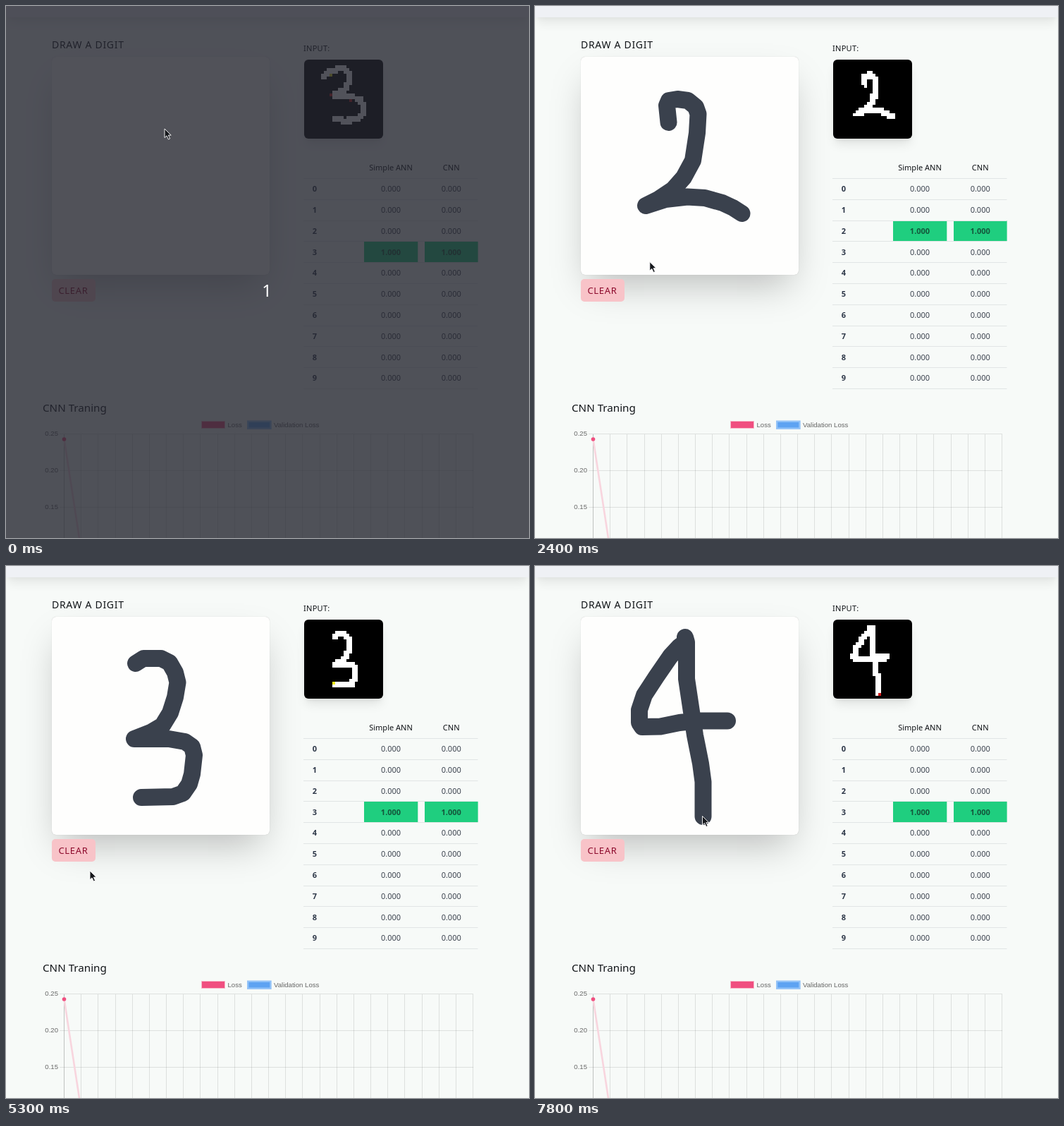
These frames come from a looping animation (742x754 px, 8 s). An HTML page:

```html
<!DOCTYPE html>
<html lang="en">
<head>
<meta charset="utf-8">
<style>
  html, body { margin: 0; width: 100%; height: 100%; overflow: hidden; background: #f7faf8; }
  div, svg { position: absolute; }
  svg { left: 0; top: 0; }
  .bar { left: 0; top: 0; width: 742px; height: 16px; background: #eff1f5;
    box-shadow: 0 10px 15px -3px rgba(0,0,0,.1), 0 4px 6px -2px rgba(0,0,0,.05); }
  .pad { left: 65px; top: 72px; width: 309px; height: 308.5px; border-radius: 6px; background: #fefefd;
    box-shadow: 0 25px 50px -12px rgba(0,0,0,.25), 0 0 1px rgba(0,0,0,.25); }
  .input { left: 422.5px; top: 76px; width: 112.5px; height: 112px; border-radius: 6px; background: #000;
    box-shadow: 0 10px 15px -3px rgba(0,0,0,.1), 0 4px 6px -2px rgba(0,0,0,.05); }
  .clear { left: 65px; top: 387px; width: 62px; height: 32px; border-radius: 5px; background: #f8c3c8; }
  text { font-family: "Noto Sans", "Open Sans", sans-serif; fill: #111418; }
  .chart text { font-family: "Liberation Sans", Arial, sans-serif; fill: #666; }
  .ink path { fill: none; stroke: #3a414d; stroke-width: 24; stroke-linecap: round; stroke-linejoin: round; }
</style>
</head>
<body>
<div class="bar"></div>
<div class="pad"></div>
<div class="input"></div>
<div class="clear"></div>
<svg id="stage" width="742" height="754" viewBox="0 0 742 754">
  <g id="labels"></g>
  <g id="marks"></g>
  <g id="table"></g>
  <g id="chart" class="chart"></g>
  <g id="ink" class="ink"></g>
  <g id="bitmaps"></g>
  <g id="countdown">
    <rect width="742" height="754" fill="#252630" fill-opacity=".795"/>
    <text x="370" y="412" font-size="24" text-anchor="middle" style="fill:#fff">1</text>
  </g>
  <path id="cursor" d="M0 0V12.6L3 9.9L5.4 15L7.6 14L5.3 9.1H9.2Z" fill="#16181c" stroke="#fff" stroke-width=".9"/>
</svg>
<script>
const $ = id => document.getElementById(id);
const LOOP = 8000, STEP = 100, ROW = 29.8;

function add(parent, tag, attrs, content = '') {
  const el = document.createElementNS('http://www.w3.org/2000/svg', tag);
  for (const name in attrs) el.setAttribute(name, attrs[name]);
  el.textContent = content;
  return parent.appendChild(el);
}
// Places text by the vertical centre of its capitals.
function label(parent, content, x, middle, size, attrs = {}) {
  return add(parent, 'text', { x, y: middle + size * .36, 'font-size': size, ...attrs }, content);
}
const line = (parent, x1, y1, x2, y2, stroke, width = 1) =>
  add(parent, 'line', { x1, y1, x2, y2, stroke, 'stroke-width': width });
const box = (parent, x, y, width, height, fill, attrs = {}) =>
  add(parent, 'rect', { x, y, width, height, fill, ...attrs });

// Headings
label($('labels'), 'DRAW A DIGIT', 65, 54.7, 14, { 'letter-spacing': '.05em' });
label($('labels'), 'INPUT:', 422, 60.5, 11, { 'letter-spacing': '.025em' });
label($('labels'), 'CLEAR', 74.5, 403.5, 13, { 'letter-spacing': '.05em', style: 'fill:#8d0a2c' });
label($('labels'), 'CNN Traning', 52, 569.7, 15.2);

// Prediction table
const COLUMNS = [546, 631.7];
const centred = { 'text-anchor': 'middle' };
['Simple ANN', 'CNN'].forEach((name, i) => label($('table'), name, COLUMNS[i], 229.5, 11, centred));
const cells = [];
for (let row = 0; row <= 10; row++) {
  const y = Math.round(244 + row * ROW) + .5;
  line($('table'), 422, y, 669.5, y, '#e1e5e5');
  if (row === 10) break;
  const middle = 259.3 + row * ROW;
  label($('table'), row, 438, middle, 11, { ...centred, 'font-weight': 700, style: 'fill:#2d3748' });
  cells.push(COLUMNS.map(x => label($('table'), '0.000', x, middle, 11, centred)));
}
const marks = [[508, 76.3], [594, 75.6]].map(([x, w]) => box($('marks'), x, 0, w, 29, '#1fce7f'));

function highlight(best) {
  marks.forEach(mark => mark.setAttribute('y', Math.round(244.4 + best * ROW)));
  cells.forEach((pair, row) => pair.forEach(cell => {
    const on = row === best;
    cell.textContent = on ? '1.000' : '0.000';
    cell.style.fill = on ? '#14573c' : '#3b424e';
    cell.style.fontWeight = on ? 700 : 400;
  }));
}

// Training chart
const chart = $('chart');
box(chart, 277.5, 588.5, 33, 10, '#f04f80', { stroke: '#f8b9c9' });
label(chart, 'Loss', 314.5, 593.3, 9.6);
box(chart, 343.2, 588.7, 32.3, 10, '#5ea3f2', { stroke: '#93c3f8', 'stroke-width': 2.4 });
label(chart, 'Validation Loss', 380, 593.3, 9.6);
['0.25', '0.20', '0.15'].forEach((tick, i) => {
  const y = 607 + i * 52;
  label(chart, tick, 74, y - 1, 9.6, { 'text-anchor': 'end' });
  line(chart, 76, y - .5, 663, y - .5, 'rgba(0,0,0,.1)');
});
for (let i = 0; i <= 24; i++) {
  const x = Math.round(82 + i * 24.17) + .5;
  line(chart, x, 607, x, 754, `rgba(0,0,0,${i ? .1 : .22})`);
}
line(chart, 82.5, 614, 106.6, 771, '#f8d5de', 2.6);
add(chart, 'circle', { cx: 82.5, cy: 614, r: 2.8, fill: '#f04f80' });

// Handwritten digits: pace lists [time, drawn share]; dots are tinted bitmap cells [column, row, colour].
const digits = [
  { d: 'M145 141L161 121L189 110L222 108L238 119L241 160L222 187L183 209L249 215L288 231L296 253L293 281L277 303L227 311L189 303',
    shown: 0, dots: [[9, 5, '#e8e020'], [9, 12, '#c01818'], [16, 14, '#c01818']] },
  { d: 'M189.5 165L187 141L190 134L202 132L217 134L228 143L231.5 153L230 180L224 219L211 243L196 260L175 274L157 283L185 274L216 270.5L241 272L266 279L281 286L293.5 294',
    pace: [[500, 0], [1250, 1]], clear: 2900, shown: 1500, dots: [] },
  { d: 'M184 138L195 131L220 131L232 137L240 151L243.5 165L240 186L233 208L222 226L205 236L182 245L231 245L254 249L264 256L267 268L264 295L260 309L251 322L237 327L192 328',
    pace: [[3400, 0], [3600, .195], [4450, 1]], clear: 5600, shown: 4600, dots: [[10, 22, '#f4ee20']] },
  { d: 'M273 219.5L228 219.5L205 222L178 227.5L152 228L148 222L148 204L155 183L172 157L192 128L205 114L213 108L213 101L215 108L215 160L221 200L227 240L235 280L238.5 306L238.5 355',
    pace: [[6500, 0], [6600, .083], [7400, .907], [7560, 1]], clear: LOOP, shown: 7800, dots: [[16, 26, '#d01818']] }
];

// Samples the stroke on a 28 x 28 grid, 11 px per cell, and shows it at 4 px per cell.
function makeBitmap({ path, dots }) {
  const group = add($('bitmaps'), 'g', { 'shape-rendering': 'crispEdges' });
  const at = (col, row) => [423 + col * 4, 76 + row * 4];
  const point = $('stage').createSVGPoint();
  let d = '';
  for (let row = 0; row < 28; row++)
    for (let col = 0; col < 28; col++) {
      point.x = 65 + (col + .5) * 11;
      point.y = 72 + (row + .5) * 11;
      if (path.isPointInStroke(point)) d += `M${at(col, row)}h4v4h-4z`;
    }
  add(group, 'path', { d, fill: '#fff' });
  dots.forEach(([col, row, fill]) => box(group, ...at(col, row), 4, 4, fill));
  return group;
}
for (const digit of digits) {
  digit.path = add($('ink'), 'path', { d: digit.d });
  digit.length = digit.path.getTotalLength();
  digit.bitmap = makeBitmap(digit);
}

// Pointer positions between strokes: [time, x, y]
const pointer = [
  [0, 225, 174], [100, 220, 174], [200, 212, 172], [400, 189.5, 165], [1300, 292.5, 292],
  [1500, 281, 295], [1600, 281, 295], [2500, 148, 371], [2700, 104, 391], [2800, 104, 391],
  [3300, 184, 138], [4500, 191, 328], [4700, 186, 335], [5300, 119, 432], [5500, 106, 403],
  [5600, 106, 402], [5900, 180, 298], [6000, 180, 298], [6400, 273, 219.5], [7600, 237.5, 354.5]
];
const LAG = 40;

function interpolate(keys, t) {
  const next = keys.findIndex(key => key[0] > t);
  if (next < 0) return keys[keys.length - 1].slice(1);
  if (next === 0) return keys[0].slice(1);
  const a = keys[next - 1], b = keys[next];
  const k = (t - a[0]) / (b[0] - a[0]);
  return a.slice(1).map((v, i) => v + (b[i + 1] - v) * k);
}

function render(t) {
  let [x, y] = interpolate(pointer, t);
  const current = digits.filter(digit => t >= digit.shown).pop();
  for (const { path, length, pace, clear, bitmap } of digits) {
    bitmap.style.display = bitmap === current.bitmap ? '' : 'none';
    const share = pace && t < clear ? interpolate(pace, t)[0] : 0;
    path.style.visibility = share ? 'visible' : 'hidden';
    path.style.strokeDasharray = share < 1 ? `${share * length} 2000` : 'none';
    if (pace && t >= pace[0][0] - 100 && t - LAG < pace[pace.length - 1][0])
      ({ x, y } = path.getPointAtLength(interpolate(pace, t - LAG)[0] * length));
  }
  highlight(t >= 1700 && t < 4800 ? 2 : 3);
  $('countdown').style.display = t < 100 ? '' : 'none';
  $('cursor').setAttribute('transform', `translate(${x} ${y})`);
}

const start = performance.now();
function frame() {
  const t = Math.max(0, performance.now() - start) % LOOP;
  render(Math.floor(t / STEP) * STEP);
  requestAnimationFrame(frame);
}
frame();
</script>
</body>
</html>
```
